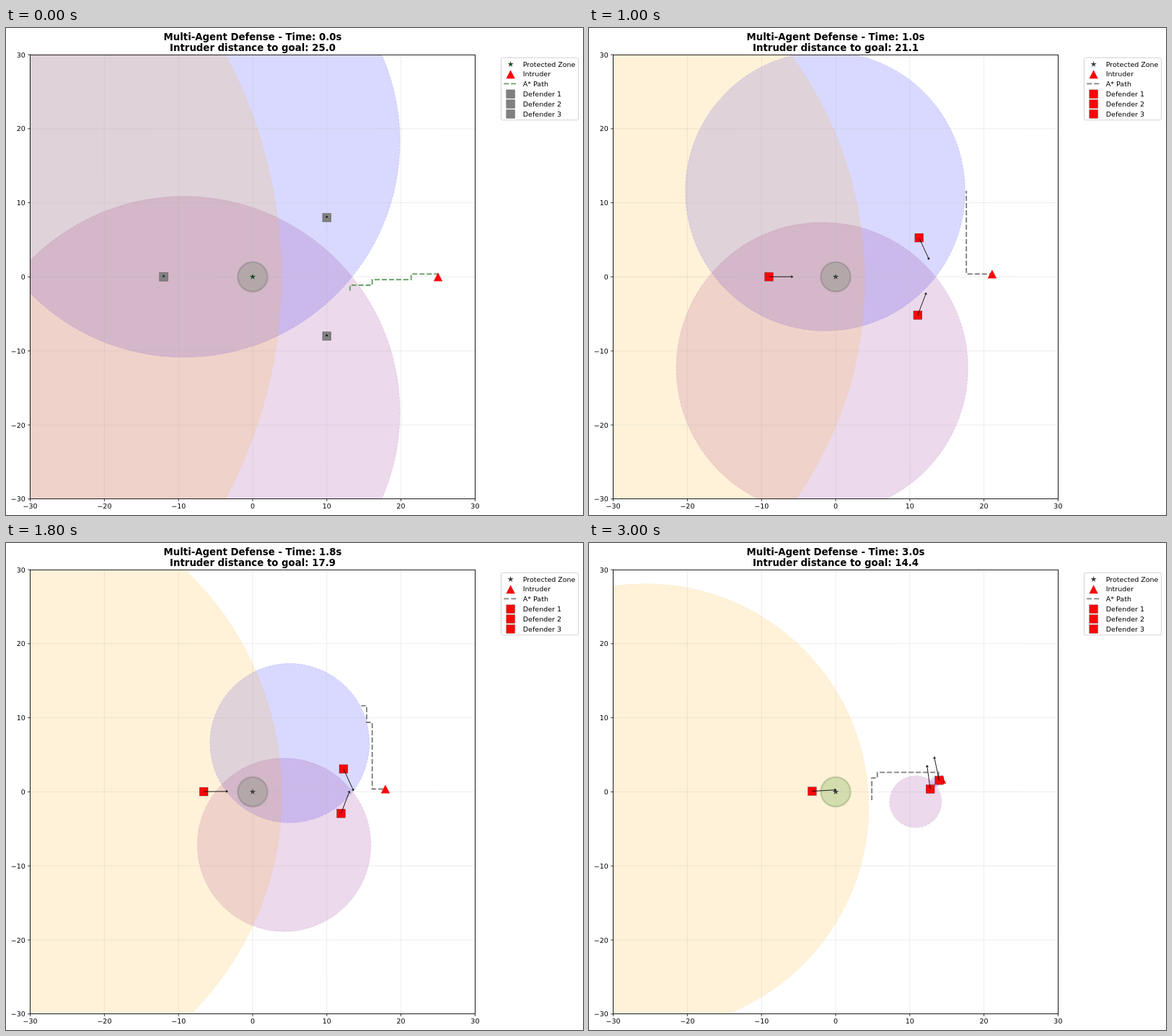
These frames come from a looping animation (800 by 676 pixels, 3100 ms). An HTML page with a canvas:

```html
<!DOCTYPE html>
<html lang="en">
<head>
<meta charset="utf-8">
<title>Multi-Agent Defense</title>
<style>
html, body { margin: 0; width: 100%; height: 100%; overflow: hidden; background: #fff; }
canvas { display: block; }
</style>
</head>
<body>
<canvas id="stage" width="800" height="676"></canvas>
<script>
const ctx = document.getElementById('stage').getContext('2d');
const STEP = 100, STEPS = 31;
const PT = 0.95;                       // pixels per typographic point
const UNIT = 10.28, CELL = 0.75;
const BOX = { x: 33.5, y: 37.3, w: 617, h: 616.3 };
const RED = '#f8070a', GRAY = '#808080';
const SPEED_RATIO = 3 / 4;             // defender to intruder
const FONT = '"DejaVu Sans", sans-serif';

const px = x => 342 + x * UNIT;
const py = y => 345.4 - y * UNIT;

// Tracks are [time, x, y] keys joined by straight lines.
const intruderTrack = [[0, 25, 0], [0.1, 24.7, 0.26], [0.2, 24.3, 0.375], [2.5, 15.1, 0.375],
  [2.6, 14.83, 0.55], [2.7, 14.7, 0.9], [2.8, 14.63, 1.26], [2.9, 14.5, 1.55], [3, 14.3, 1.7]];

const defenders = [
  { region: '0,0,255', track: [[0, 10, 8], [2.5, 13.13, 1.18], [2.6, 13.34, 0.96],
    [2.7, 13.57, 0.82], [2.8, 13.82, 1], [2.9, 14.01, 1.26], [3, 13.95, 1.55]] },
  { region: '128,0,128', track: [[0, 10, -8], [2.2, 12.35, -1.79], [2.6, 12.7, -0.68],
    [2.7, 12.79, -0.41], [2.8, 12.83, -0.18], [2.9, 12.8, 0.08], [3, 12.76, 0.37]] },
  { region: '255,165,0', track: [[0, -12, 0], [1.2, -8.4, 0.01], [2.6, -4.19, 0.05],
    [2.9, -3.42, 0.065], [3, -3.17, 0.08]] }
];

// Each route lists grid columns and rows in turn: go to column, then row, and so on.
const routes = [
  { from: 0, turns: [28, -1, 21, -2, 17, -3] },
  { from: 4, turns: [24, -1, 18, -3, 13] },
  { from: 10, turns: [23, 15] },
  { from: 15, turns: [21, 12, 20, 15, 19] },
  { from: 21, turns: [20, 8, 19, 10, 18, 11, 17, 12, 16, 13, 15] },
  { from: 25, turns: [19, 3, 18, 5, 10, 4, 6] },
  { from: 28, turns: [18, 3, 7, 2, 6, -2] }
];

function at(track, t) {
  let i = 1;
  while (i < track.length - 1 && t > track[i][0]) i++;
  const [t0, x0, y0] = track[i - 1], [t1, x1, y1] = track[i];
  const k = (t - t0) / (t1 - t0);
  return { x: x0 + (x1 - x0) * k, y: y0 + (y1 - y0) * k };
}

function polyline(points, color, width, dash = []) {
  ctx.beginPath();
  points.forEach(([x, y]) => ctx.lineTo(x, y));
  ctx.strokeStyle = color;
  ctx.lineWidth = width;
  ctx.setLineDash(dash);
  ctx.stroke();
  ctx.setLineDash([]);
}

function polygon(points, color) {
  ctx.beginPath();
  points.forEach(([x, y]) => ctx.lineTo(x, y));
  ctx.closePath();
  ctx.fillStyle = color;
  ctx.fill();
}

function text(str, x, y, size, align = 'center', weight = '') {
  ctx.font = `${weight} ${size * PT}px ${FONT}`;
  ctx.textAlign = align;
  ctx.fillStyle = '#000';
  ctx.fillText(str, x, y);
}

function square(x, y, color) {
  ctx.fillStyle = color;
  ctx.fillRect(x - 5.9, y - 5.9, 11.8, 11.8);
  ctx.strokeStyle = 'rgba(0,0,0,0.4)';
  ctx.lineWidth = 0.6;
  ctx.strokeRect(x - 5.9, y - 5.9, 11.8, 11.8);
}

function triangle(x, y) {
  polygon([[x, y - 6], [x + 6.2, y + 6], [x - 6.2, y + 6]], RED);
}

function star(x, y, color) {
  const points = [];
  for (let i = 0; i < 10; i++) {
    const r = i % 2 ? 1.7 : 4.4, a = i * Math.PI / 5;
    points.push([x + r * Math.sin(a), y - r * Math.cos(a)]);
  }
  polygon(points, color);
}

// Points the defender reaches before the intruder form an Apollonius circle.
function region(d, intruder, rgb) {
  const k2 = SPEED_RATIO ** 2;
  const x = (d.x - k2 * intruder.x) / (1 - k2);
  const y = (d.y - k2 * intruder.y) / (1 - k2);
  const r = SPEED_RATIO * Math.hypot(d.x - intruder.x, d.y - intruder.y) / (1 - k2);
  ctx.beginPath();
  ctx.arc(px(x), py(y), r * UNIT, 0, 2 * Math.PI);
  ctx.fillStyle = ctx.strokeStyle = `rgba(${rgb},0.15)`;
  ctx.fill();
  ctx.lineWidth = PT;
  ctx.setLineDash([3.5, 1.5]);
  ctx.stroke();
  ctx.setLineDash([]);
}

function zone() {
  ctx.beginPath();
  ctx.arc(px(0), py(0), 2 * UNIT, 0, 2 * Math.PI);
  ctx.fillStyle = 'rgba(0,128,0,0.2)';
  ctx.fill();
  ctx.strokeStyle = 'rgba(60,115,70,0.28)';
  ctx.lineWidth = 2.4;
  ctx.stroke();
}

function grid() {
  for (let v = -30; v <= 30; v += 10) {
    const x = px(v), y = py(v);
    polyline([[x, BOX.y], [x, BOX.y + BOX.h]], 'rgba(176,176,176,0.3)', 0.8);
    polyline([[BOX.x, y], [BOX.x + BOX.w, y]], 'rgba(176,176,176,0.3)', 0.8);
  }
}

function axes() {
  const bottom = BOX.y + BOX.h;
  ctx.strokeStyle = '#000';
  ctx.lineWidth = 0.9;
  ctx.strokeRect(BOX.x, BOX.y, BOX.w, BOX.h);
  for (let v = -30; v <= 30; v += 10) {
    const label = String(v).replace('-', '\u2212'), x = px(v), y = py(v);
    polyline([[x, bottom], [x, bottom + 3.3]], '#000', 0.8);
    polyline([[BOX.x - 3.3, y], [BOX.x, y]], '#000', 0.8);
    text(label, x, 667.4, 10);
    text(label, 26.9, y + 3.6, 10, 'right');
  }
}

function route(step, intruder, color) {
  const { turns } = routes.filter(r => r.from <= step).pop();
  let col = Math.floor(intruder.x / CELL), row = Math.floor(intruder.y / CELL);
  const points = [];
  const visit = () => points.push([px((col + 0.5) * CELL), py((row + 0.5) * CELL)]);
  visit();
  turns.forEach((v, i) => {
    if (i % 2) row = v; else col = v;
    visit();
  });
  polyline(points, color, 1.9, [7, 3]);
}

function arrow(x, y, dx, dy) {
  const len = Math.hypot(dx, dy);
  const ux = len ? dx / len : 0, uy = len ? dy / len : -1;
  const reach = len ? 3 * UNIT : 0;
  const hx = x + ux * reach, hy = y + uy * reach;
  polyline([[x, y], [hx, hy]], '#111', 0.95);
  polygon([[hx + ux * 3, hy + uy * 3], [hx - uy * 2, hy + ux * 2], [hx + uy * 2, hy - ux * 2]], '#111');
}

function legend(defenderColor, pathColor, starColor) {
  const x = 699.6;
  ctx.beginPath();
  ctx.roundRect(686.5, 41.3, 107, 86.5, 2);
  ctx.fillStyle = '#fff';
  ctx.fill();
  ctx.strokeStyle = '#d0d0d0';
  ctx.lineWidth = 0.95;
  ctx.stroke();
  star(x, 50.3, starColor);
  triangle(x, 64.3);
  polyline([[690.2, 77.4], [709, 77.4]], pathColor, 1.9, [7, 3]);
  [91.7, 105.5, 119.4].forEach(y => square(x, y, defenderColor));
  ['Protected Zone', 'Intruder', 'A* Path', 'Defender 1', 'Defender 2', 'Defender 3']
    .forEach((label, i) => text(label, 716.8, 53.6 + i * 13.88, 10, 'left'));
}

function draw(step) {
  const t = step / 10, idle = step === 0;
  const intruder = at(intruderTrack, t);
  const defenderColor = idle ? GRAY : RED;
  const pathColor = idle ? '#69a069' : GRAY;
  const starColor = idle ? '#1f4a29' : '#3c3f42';

  ctx.fillStyle = '#fff';
  ctx.fillRect(0, 0, 800, 676);

  ctx.save();
  ctx.beginPath();
  ctx.rect(BOX.x, BOX.y, BOX.w, BOX.h);
  ctx.clip();
  zone();
  defenders.forEach(d => region(at(d.track, t), intruder, d.region));
  grid();
  route(step, intruder, pathColor);
  star(px(0), py(0), starColor);
  triangle(px(intruder.x), py(intruder.y));
  const poses = defenders.map(d => ({ now: at(d.track, t), before: at(d.track, Math.max(0, t - 0.1)) }));
  poses.forEach(({ now }) => square(px(now.x), py(now.y), defenderColor));
  poses.forEach(({ now, before }) =>
    arrow(px(now.x), py(now.y), now.x - before.x, before.y - now.y));
  ctx.restore();

  axes();
  legend(defenderColor, pathColor, starColor);
  const distance = Math.hypot(intruder.x, intruder.y);
  text(`Multi-Agent Defense - Time: ${t.toFixed(1)}s`, 342, 17.1, 14, 'center', 'bold');
  text(`Intruder distance to goal: ${distance.toFixed(1)}`, 342, 31.7, 14, 'center', 'bold');
}

const start = performance.now();
function tick() {
  draw(Math.floor((performance.now() - start) / STEP) % STEPS);
  requestAnimationFrame(tick);
}
tick();
</script>
</body>
</html>
```
